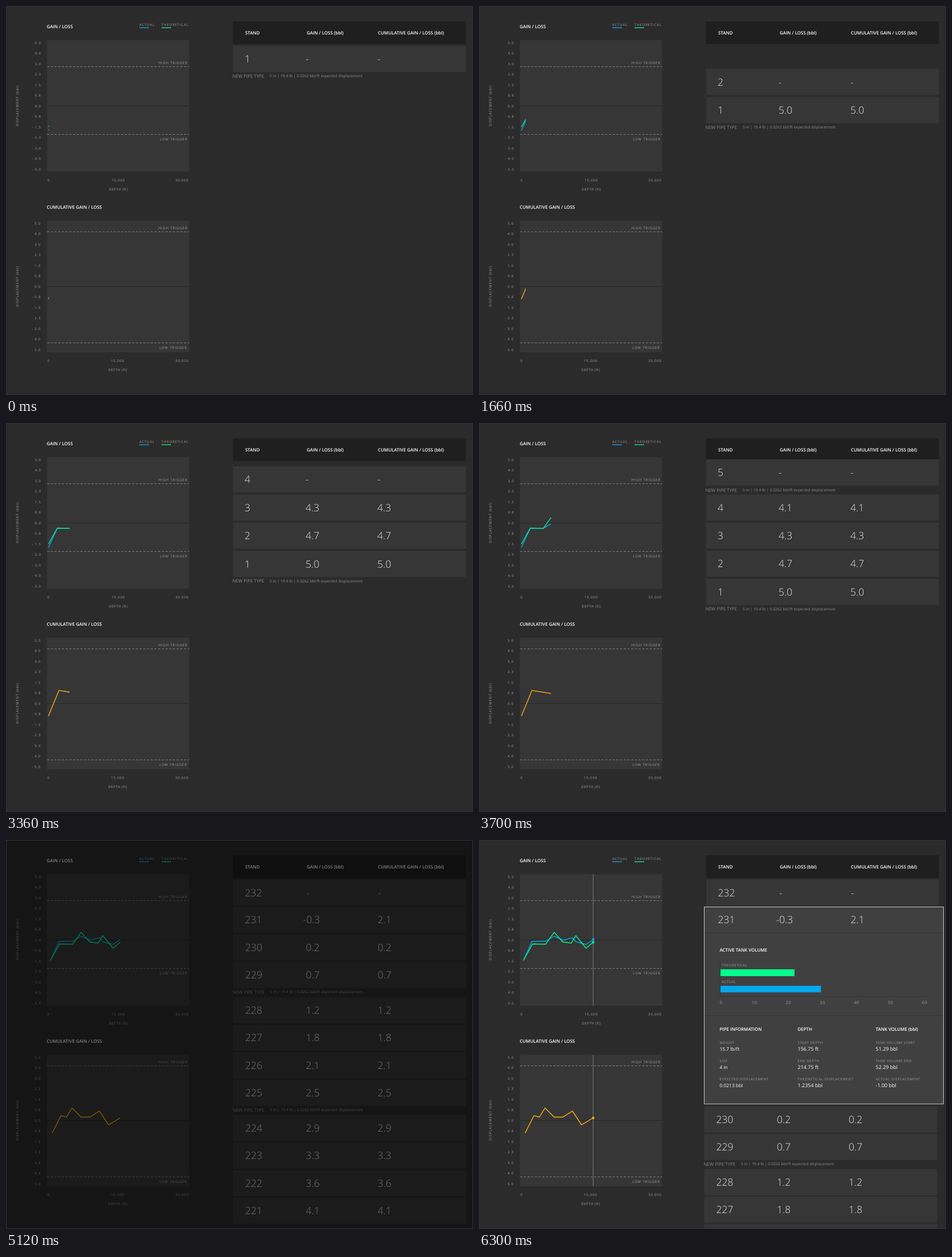
An HTML page with a canvas for the animation above (7.8 s loop, 820 px wide and 683 px high).

```html
<!DOCTYPE html>
<html lang="en">
<head>
<meta charset="utf-8">
<title>Gain / Loss</title>
<style>
html, body { margin: 0; width: 100%; height: 100%; overflow: hidden; background: #2b2b2b; }
canvas { display: block; }
</style>
</head>
<body>
<canvas id="stage" width="820" height="683"></canvas>
<script>
const ctx = document.getElementById('stage').getContext('2d');
const LOOP = 7800, STEP = 20;
const BLUE = '#00a8ec', GREEN = '#00ff8c', YELLOW = '#ffb20a';
const GREY = '#a0a0a0', ROW = '#363636';

const clamp = v => Math.max(0, Math.min(1, v));
const easeOut = u => 1 - (1 - u) ** 2;
const easeInOut = u => u < .5 ? 4 * u ** 3 : 1 - 4 * (1 - u) ** 3;

function rect(x, y, w, h, color) {
  ctx.fillStyle = color;
  ctx.fillRect(x, y, w, h);
}

// y is the middle of the capitals
function text(str, x, y, size, { weight = 400, color = GREY, gap = 0, align = 'left' } = {}) {
  ctx.font = `${weight} ${size}px "Open Sans", sans-serif`;
  ctx.textRendering = 'geometricPrecision';
  ctx.letterSpacing = gap + 'px';
  ctx.textAlign = align;
  ctx.fillStyle = color;
  const trailing = align === 'right' ? gap : align === 'center' ? gap / 2 : 0;
  ctx.fillText(str, x + trailing, y + size * .357);
}
const title = (str, x, y) => text(str, x, y, 7.9, { weight: 600, color: '#fff' });
const small = (str, x, y, align = 'left', gap = .85) => text(str, x, y, 6, { gap, align });

function faded(alpha, draw) {
  if (alpha <= 0) return;
  ctx.save();
  ctx.globalAlpha *= alpha;
  draw();
  ctx.restore();
}

function clipped(x, y, w, h, draw) {
  ctx.save();
  ctx.beginPath();
  ctx.rect(x, y, w, h);
  ctx.clip();
  draw();
  ctx.restore();
}

function line(points, color, width = 1, dash = []) {
  ctx.beginPath();
  points.forEach(([x, y]) => ctx.lineTo(x, y));
  ctx.setLineDash(dash);
  ctx.strokeStyle = color;
  ctx.lineWidth = width;
  ctx.stroke();
  ctx.setLineDash([]);
}

function dot(x, y, color) {
  ctx.beginPath();
  ctx.arc(x, y, 2.2, 0, 7);
  ctx.fillStyle = color;
  ctx.fill();
}

// ---- charts ----
const TICKS = ['5.0', '4.0', '3.0', '2.3', '1.5', '0.8', '0.0',
  '- 0.8', '- 1.5', '- 2.3', '- 3.0', '- 4.0', '- 5.0'];

function chartFrame(name, top, high, low, highLabel, lowLabel, dx) {
  title(name, 71.5, top - 24.3);
  rect(72, top, 249.5, 231, ROW);
  line([[72, top + 115.5], [321.5, top + 115.5]], '#262626');
  for (const y of [high, low]) line([[72, y], [321.5, y]], '#7c7c7c', 1, [4, 2.5]);
  small('HIGH TRIGGER', 318, highLabel, 'right');
  small('LOW TRIGGER', 318 + dx, lowLabel, 'right');
  TICKS.forEach((label, i) => small(label, 61 + dx / 2, top + 4.5 + i * 18.5, 'right'));
  small('0', 72.5, top + 245.5);
  small('15,000', 196.7 + dx, top + 245.5, 'center');
  small('30,000', 320, top + 245.5, 'right');
  small('DEPTH (ft)', 197 + dx, top + 261.5, 'center', .5);
  ctx.save();
  ctx.translate(20, top + 115.5);
  ctx.rotate(-Math.PI / 2);
  small('DISPLACEMENT (bbl)', 0, 0, 'center', .8);
  ctx.restore();
}

function staticParts() {
  rect(0, 0, 820, 683, '#2b2b2b');
  chartFrame('GAIN / LOSS', 60, 106.5, 225.5, 100, 233.5, 0);
  chartFrame('CUMULATIVE GAIN / LOSS', 377, 396.5, 591.5, 389.5, 600, -1);
  small('ACTUAL', 234, 32.5);
  small('THEORETICAL', 273, 32.5);
  rect(234, 37.5, 17, 1.5, '#1597cf');
  rect(273, 37.5, 17, 1.5, '#14d67f');
  rect(398.5, 27, 409, 40, '#1f1f1f');
  title('STAND', 420, 46.8);
  title('GAIN / LOSS (bbl)', 528, 46.8);
  title('CUMULATIVE GAIN / LOSS (bbl)', 653, 46.8);
}

// ---- table ----
const number = (str, x, y) => text(str, x, y, 17.5, { weight: 300, color: '#e6e6e6' });

function values(gain, total, y, dx = 0) {
  number(gain, (gain.length > 3 ? 521 : 526) + dx, y);
  number(total, 652 + dx, y);
}

const rowBack = (y, dx = 0) => rect(398.5 + dx, y - 23, 409, 46, ROW);

function pipeLabel(y, dx = 0) {
  text('NEW PIPE TYPE', 397.5 + dx, y, 7.9, { color: '#8c8c8c' });
  text('5 in | 19.4 lb | 0.0262 bbl/ft expected displacement', 463 + dx, y, 6.83, { color: '#8c8c8c' });
}

// ---- first scene: stands being added ----
const ADDS = [
  { start: 580, end: 1000, shift: 49.4, value: '5.0', tip: 82 },
  { start: 1480, end: 1900, shift: 49.4, value: '4.7', tip: 89 },
  { start: 2380, end: 2800, shift: 49.4, value: '4.3', tip: 111.7 },
  { start: 3360, end: 3700, shift: 55.4, value: '4.1', tip: 127 }
];
const FIRST_TIP = 75.3;
const GROWING = [
  [[[74.5, 218.5], [90, 185], [113, 185], [126.5, 177]], '#0e9fd8'],
  [[[74.5, 212.5], [90, 184.5], [113, 185], [126.5, 166]], '#10dd94'],
  [[[74.5, 514.5], [93, 469.5], [126.5, 475]], '#f0a51e']
];

function addingScene(t) {
  const slides = ADDS.map(a => a.shift * easeOut(clamp((t - a.start + STEP) / 350)));
  const fades = ADDS.map(a => clamp((t - a.end) / 240 + 1));
  const slideFrom = i => slides.slice(i).reduce((sum, s) => sum + s, 0);

  let tip = FIRST_TIP;
  ADDS.forEach((a, i) => { tip += (a.tip - (i ? ADDS[i - 1].tip : FIRST_TIP)) * fades[i]; });
  clipped(72, 60, tip - 72, 548, () => GROWING.forEach(([points, color]) => line(points, color, 1.5)));

  for (let i = 0; i <= ADDS.length; i++) {
    const y = (i === 4 ? 86.8 : 93) + slideFrom(i);
    const done = fades[i] || 0;
    faded(i ? fades[i - 1] : 1, () => {
      rowBack(y);
      number(String(i + 1), 419, y);
      faded(1 - done, () => values('-', '-', y));
      faded(done, () => values(ADDS[i].value, ADDS[i].value, y));
    });
  }
  faded(fades[3], () => pipeLabel(117.7));
  pipeLabel(123 + slideFrom(0));
}

// ---- second scene: one stand opens ----
const HISTORY = [
  [[[78, 211.5], [93, 178], [117, 177.5], [132, 169], [148, 176], [164, 171.5],
    [171, 179], [188, 183.5], [200.5, 174.5]], BLUE],
  [[[78, 211.5], [94, 182.5], [117, 183], [132, 162], [147, 179], [162, 181],
    [170, 168], [188, 190], [200.5, 179.5]], GREEN],
  [[[81, 514.5], [96.5, 484], [106, 486.5], [116, 470.5], [132, 486.5], [147, 486.5],
    [164, 476], [180, 500], [200.5, 488]], YELLOW]
];
const GAINS = ['0.2', '0.7', '1.2', '1.8', '2.1', '2.5', '2.9', '3.3', '3.6', '4.1', '4.5'];
const DETAILS = [
  [422.5, 'PIPE INFORMATION', 8.4, ['WEIGHT', '15.7 lb/ft'], ['SIZE', '4 in'], ['EXPECTED DISPLACEMENT', '0.0213 bbl']],
  [559.5, 'DEPTH', 9, ['START DEPTH', '156.75 ft'], ['END DEPTH', '214.75 ft'], ['THEORETICAL DISPLACEMENT', '1.2354 bbl']],
  [696.5, 'TANK VOLUME (bbl)', 9, ['TANK VOLUME START', '51.29 bbl'], ['TANK VOLUME END', '52.29 bbl'], ['ACTUAL DISPLACEMENT', '-1.00 bbl']]
];

function panelContent() {
  line([[396, 163.5], [815, 163.5]], '#363636');
  line([[396, 308.5], [815, 308.5]], '#363636');
  title('ACTIVE TANK VOLUME', 422.5, 193);
  line([[423.5, 212], [423.5, 274]], '#333');
  line([[423, 274.5], [788, 274.5]], '#333');
  small('THEORETICAL', 426, 220, 'left', .6);
  rect(424, 227, 130, 12, GREEN);
  small('ACTUAL', 426, 248.5, 'left', .6);
  rect(424, 256, 176.5, 11.5, BLUE);
  for (let i = 0; i <= 6; i++)
    text(String(i * 10), (i ? 423.5 : 425) + i * 59.8, 285.5, 7.5, { gap: .5, align: 'center' });
  for (const [x, heading, size, ...items] of DETAILS) {
    title(heading, x, 332);
    items.forEach(([label, value], i) => {
      small(label, x, 356 + i * 32, 'left', .6);
      text(value, x, 367.2 + i * 32, size, { color: '#fff' });
    });
  }
}

function detailScene(t) {
  const u = clamp((t - 5960) / 340), open = easeInOut(u);

  faded(open, () => {
    line([[200.5, 60], [200.5, 291]], '#7c7c7c');
    line([[200.5, 377], [200.5, 608]], '#7c7c7c');
  });
  HISTORY.forEach(([points, color]) => {
    line(points, color, 1.4);
    faded(open, () => dot(...points[points.length - 1], color));
  });

  rowBack(92.5, .5);
  number('232', 419.5, 93);
  values('-', '-', 93, 1);

  const dx = .5 - 3.5 * open, dy = 302 * open;
  GAINS.forEach((gain, i) => {
    const group = Math.floor((i + 2) / 4);
    const y = 188.5 + i * 48.3 + group * 13.8 + dy;
    rowBack(y, dx);
    number(String(230 - i), 419.5 + dx, y);
    values(gain, gain, y, dx);
    if (i % 4 === 1 && i < 9) pipeLabel(y + 30, dx);
  });

  const height = 45 + 301 * open;
  rowBack(140, .5);
  faded(u, () => rect(395.5, 117.5, 420, height, '#404040'));
  clipped(395, 117, 421, height, () => faded(open, panelContent));
  number('231', 419.5, 140);
  values('-0.3', '2.1', 140, .5);
  if (u) faded(clamp(.15 + u), () => {
    ctx.strokeStyle = '#c8c8c8';
    ctx.lineWidth = 1;
    ctx.strokeRect(395.5, 117.5, 420, Math.round(height));
  });
}

function draw(now) {
  const t = Math.floor(now % LOOP / STEP) * STEP;
  staticParts();
  if (t < 5060) addingScene(t);
  else detailScene(t);
  const dark = t < 5060 ? clamp((t - 4760) / 180) : clamp((5180 - t) / 120);
  faded(dark, () => rect(0, 0, 820, 683, '#000'));
  ctx.strokeStyle = '#333';
  ctx.lineWidth = 1;
  ctx.strokeRect(.5, .5, 819, 682);
}

const begin = performance.now();
function tick() {
  draw(performance.now() - begin);
  requestAnimationFrame(tick);
}
tick();
</script>
</body>
</html>
```
